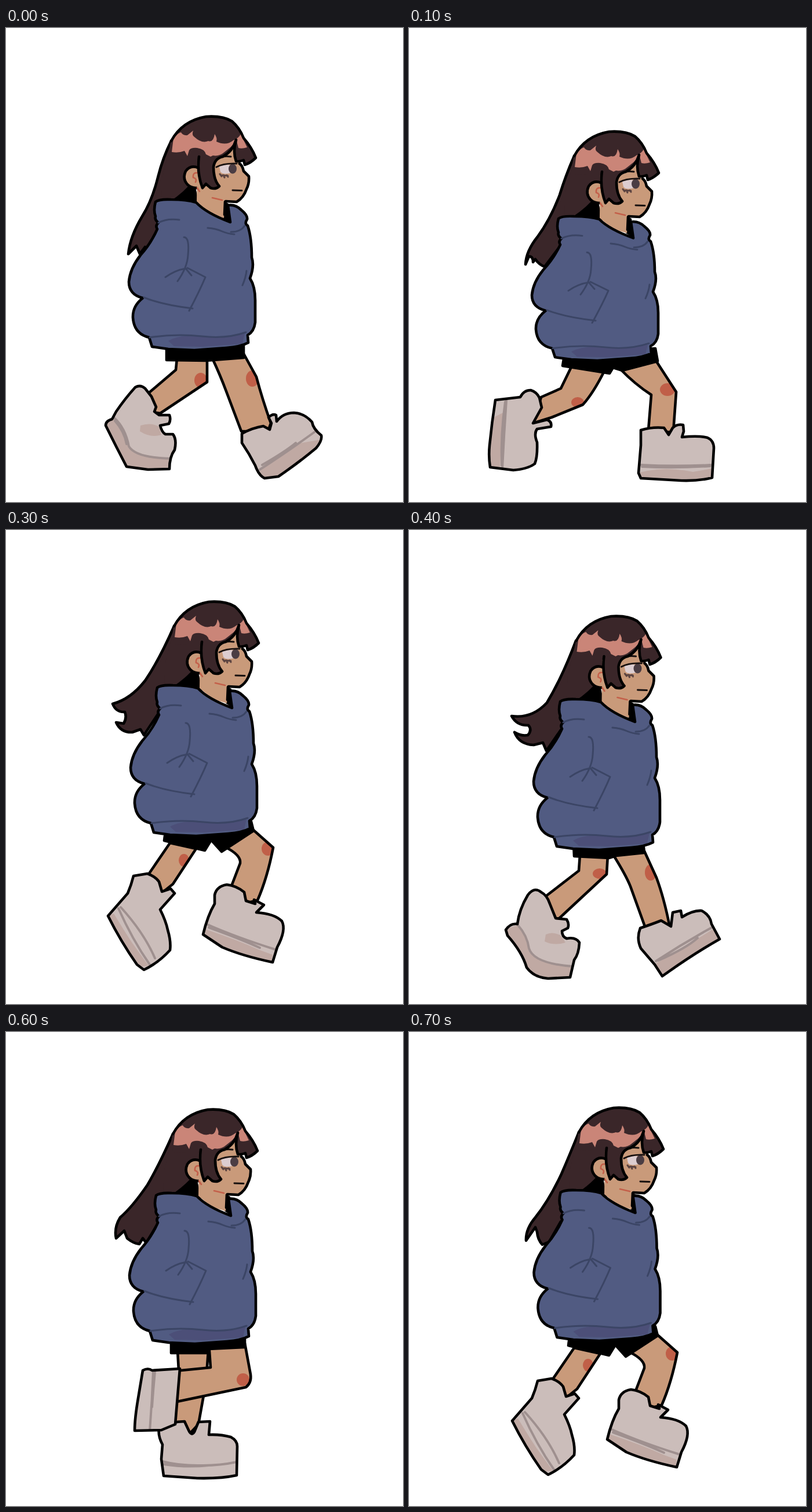
An HTML page for the animation above (0.8 s loop, 685 px wide and 818 px high).

```html
<!DOCTYPE html>
<html lang="en">
<head>
<meta charset="utf-8">
<title>Walk cycle</title>
<style>
html, body { margin: 0; width: 100%; height: 100%; overflow: hidden; background: #fff; }
svg { display: block; width: 100%; height: 100%; }
path, ellipse { fill: none; stroke-linecap: round; stroke-linejoin: round; }
.ink { stroke: #000; stroke-width: 4.6; }
.black { fill: #000; }
.skin { fill: #c99a7a; }
.hair { fill: #3a2629; }
.shine { fill: #ca8578; }
.cloth { fill: #515b82; }
.hem { fill: #4c4f78; }
.fold { stroke: #3b4565; stroke-width: 3; }
.shoe { fill: #cbbdba; }
.sole { fill: #c0a9a3; }
.seam { stroke: #9f908f; stroke-width: 4; }
.knee { fill: #c05f48; }
.red { stroke: #c4604a; stroke-width: 2.6; }
.white { fill: #dccdd0; }
.iris { fill: #4b3d43; }
.thin { stroke: #17100f; stroke-width: 3; }
.lash { stroke: #5b4340; stroke-width: 3; }
.pose { visibility: hidden; animation: show 800ms step-end infinite; animation-delay: calc(var(--i) * 100ms - 800ms); }
@keyframes show { 0% { visibility: visible; } 12.5%, 100% { visibility: hidden; } }
</style>
</head>
<body>
<svg id="stage" viewBox="0 0 685 818"></svg>
<script>
let clips = 0;
const path = (cls, d) => `<path class="${cls}" d="${d}"/>`;
const oval = (cls, x, y, rx, ry) => `<ellipse class="${cls}" cx="${x}" cy="${y}" rx="${rx}" ry="${ry}"/>`;
const use = (id, move = '') => `<use href="#${id}" transform="${move}"/>`;

// A filled, outlined shape whose inner details stay inside its edge.
function shape(cls, d, details = '', line = d) {
  const id = 'c' + clips++;
  return `<clipPath id="${id}"><path d="${d}"/></clipPath>` +
    `<g clip-path="url(#${id})">${path(cls, d)}${details}</g>` + path('ink', line);
}
const leg = (d, x, y, rx, ry) => shape('skin', d, oval('knee', x, y, rx, ry));
const shoe = (d, seam, sole = '', extra = '') =>
  shape('shoe', d, (sole && path('sole', sole)) + extra + path('seam', seam));
const shorts = d => path('black ink', d);

const fringe = 'M285 195Q304 160 345 153Q374 151 390 161Q403 172 410 190Q424 206 431 224Q422 233 412 236L410 228Q403 231 397 230Q391 213 397 193Q391 213 374 222Q360 225 358 240Q358 262 368 273Q362 279 353 276L345 269L339 276Q329 250 333 222';

const head = [
  path('hair', 'M285 194L278 225L270 258L268 300H300L328 272L334 200Z'),
  path('black', 'M282 300Q308 283 324 262L334 306ZM375 298L384 303L388 337L374 328Z'),
  path('skin', 'M330 222L396 196L402 232Q405 238 409 241Q411 250 420 255Q420 268 415 278Q410 294 398 300Q386 302 378 299L376 328L352 321L329 302Z'),
  path('ink', 'M403 234Q408 237 410 247L419 256Q420 268 415 278Q410 293 398 300L379 299'),
  path('ink', 'M378 300L377 322'),
  path('skin ink', 'M331 241Q318 236 310 247Q304 260 313 270Q320 277 330 276'),
  path('skin', 'M326 244H342V280L330 279Z'),
  path('red', 'M330 250Q322 249 323 258Q330 260 327 266M330 276L334 282M356 293L373 297'),
  path('white', 'M368 239Q380 234 388 237L388 250Q374 254 370 248Z'),
  oval('iris', 391, 243, 7, 8.5),
  path('thin', 'M363 240Q376 233 398 234M359 226Q374 220 388 222M391 280L407 280.5'),
  path('lash', 'M369 252L372 256M375 254L377 258M381 254L383 257M371 254L383 255'),
  shape('hair', fringe + 'L333 228L284 226Z',
    path('shine', 'M289 190Q297 181 302 180Q305 186 313 185L323 177Q320 185 325 188Q338 200 349 195Q358 198 360 183Q365 190 363 196Q380 204 392 194Q402 190 405 183L416 206Q407 209 401 207L398 195L387 206L377 214Q368 222 357 220L353 222L345 218Q343 209 330 207Q319 206 316 211L313 221L308 212Q298 216 286 214Z'),
    fringe)
].join('');

const hoodie = [
  shape('cloth', 'M258 300Q264 295 285 296Q312 296 328 301Q346 320 387 335L383 306Q396 304 406 314Q417 323 416 330Q411 338 417 341Q424 362 424 396Q429 410 421 432Q430 446 430 470V508Q428 524 417 530L418 543Q405 550 380 552L325 556L280 554L252 550L247 534Q221 528 219 500Q218 480 236 466Q212 460 212 438Q214 415 232 392Q250 372 261 347Q257 341 263 336Q256 331 258 325Q254 315 258 300Z',
    path('hem', 'M280 540Q300 528 340 532Q380 536 412 527L408 545L340 550L290 549Z')),
  path('fold', 'M263 336Q278 328 299 331M348 345Q362 346 373 351Q382 355 394 356M388 352Q405 352 412 341'),
  path('fold', 'M307 361Q317 361 314 392Q313 413 296 437M275 430Q292 418 310 415L320 427M313 414L344 430Q334 454 316 488M238 465Q270 478 322 484'),
  path('fold', 'M415 419Q414 430 408 444M248 534Q294 527 338 532Q380 537 414 525')
].join('');

const push =
  leg('M285 545L246 602L270 632L290 616L330 555Z', 309, 575, 9, 11) +
  leg('M380 552Q408 566 406 580L390 622L420 648L436 644Q453 605 463 553L428 522Z', 454, 555, 11, 12) +
  shoe('M222 602L246 598Q260 603 266 612L271 629L286 624L293 632L268 660Q278 680 281 695Q287 715 285 730Q265 752 240 764L228 755Q200 715 178 671L212 632Q218 618 222 602Z',
    'M196 658Q220 712 250 755M200 656Q240 700 259 744', 'M188 667Q208 700 220 718L248 757L228 760L176 672Z') +
  shoe('M362 635Q365 620 383 617Q400 619 413 630L416 645L432 650L430 643L447 652L434 665Q465 667 478 680Q486 695 470 725L462 751Q410 740 375 725L342 703Q350 670 362 650Z',
    'M350 686Q400 708 467 729M352 691Q405 710 440 726', 'M346 694Q400 712 440 730L462 738L460 752L375 728L340 704Z') +
  shorts('M276 533L275 541L345 558L356 540L374 560L429 524L425 508Z');

const stand =
  leg('M296 553L299 605L286 682L318 695L332 680L345 608L349 553Z', 339, 594, 11, 12) +
  shoe('M264 688Q285 675 308 675L315 690Q320 701 325 693L332 676L352 675L350 698Q370 697 388 702Q399 708 399 718L398 768Q370 774 330 773L272 769L268 740L270 715Q262 700 264 688Z',
    'M270 744Q300 752 340 751Q370 751 398 745M272 749Q310 755 350 751');
const lifted = shoe('M236 587Q245 582 252 587L300 584L292 680L268 690L222 691Q222 670 228 635Z',
  'M254 588Q252 640 248 692M257 589Q254 620 252 650');
const passShorts = shorts('M285 534V554H348L350 547L412 544V522Z');

const parts = { head, hoodie, push, stand, lifted };

const poses = [
  { head: [0, 0], body: [1, 0, 0],
    tail: 'M285 195Q270 225 262 258Q252 298 235 325Q214 360 211 390L225 376L231 390L240 378L246 387L262 346L300 330',
    legs: leg('M295 570L293 590L246 630L248 662L266 665L347 611V570Z', 336, 608, 11, 13) +
      leg('M356 570Q370 600 380 627L406 696H452L457 682Q442 640 432 602L410 562Z', 425, 605, 11, 14) +
      shoe('M223 620Q232 615 240 622L251 636L259 654L256 662L264 668L282 668Q285 676 281 683L266 686Q269 698 275 701L288 701Q295 710 291 728Q282 740 282 761L245 762L208 757L190 722L172 686Q172 678 183 675L190 662Q205 640 223 620Z',
        'M186 672Q206 690 212 722Q224 742 286 743M188 678Q204 696 208 718',
        'M186 672Q206 690 212 722Q224 742 286 743V770H200L165 680Z',
        path('sole', 'M232 686Q250 680 264 688L268 702Q250 708 231 696Z')) +
      shoe('M407 700Q425 690 444 687L455 693L458 682L453 672Q460 665 466 668L467 679Q478 664 497 664Q515 665 528 680Q530 692 544 703Q546 712 535 725Q505 750 470 774L446 777Q436 772 430 755Q420 735 407 716Z',
        'M438 762Q490 728 534 696M442 754Q482 731 500 716', 'M438 765Q470 738 510 716L545 710L530 740L470 785H438Z') +
      shorts('M277 550V573L345 574L410 569V545Z') },
  { head: [0, 26], body: [0.957, 0, 41.8],
    tail: 'M285 221Q270 255 260 288Q244 330 222 360Q202 385 201 408L207 394Q214 394 214 404L218 399Q224 408 234 412L262 375L300 355',
    legs: leg('M280 585L262 622L228 637L214 682L246 672L300 650Q318 630 337 592Z', 291, 646, 11, 9) +
      leg('M364 588Q390 615 418 633L413 694L456 698L461 628L426 574Z', 446, 624, 13, 11) +
      shoe('M149 642L192 637Q198 625 210 625Q220 628 225 638L229 655L214 682L238 676Q247 679 245 688L221 692Q215 700 221 715Q222 740 217 752Q205 761 180 763L140 758Q137 740 139 720Q143 680 149 642Z',
        'M168 642Q164 700 161 760M166 645Q158 700 160 755', 'M146 672L162 664L157 757L136 760Z') +
      shoe('M400 694Q420 688 440 690L448 702L455 690Q462 683 473 685L474 696L471 706Q500 703 515 707Q526 712 526 725L523 776Q500 782 470 781L400 777L396 768L400 720Z',
        'M400 754Q460 757 525 754M402 757Q460 760 520 756', 'M398 767Q440 756 490 766L524 760V785H396Z') +
      shorts('M268 565L265 583L346 596L352 586L368 591L429 575L425 553Z') },
  { head: [1.5, -20], body: [1, -1, -17.5],
    tail: 'M286 175Q262 228 240 263Q198 305 193 325Q188 345 195 357L206 345Q214 352 210 359Q222 362 229 362L232 354L240 364L258 335L300 315',
    legs: use('lifted') +
      leg('M368 545L371 583L335 591L338 631L424 613Q424 594 414 542Z', 412, 603, 11, 11) +
      use('stand') + passShorts },
  { head: [5, -29], body: [1, 3, -28],
    tail: 'M290 166Q264 225 240 260Q215 292 184 300Q190 315 205 314Q209 324 203 334L190 332Q198 350 218 349L232 344L238 354L262 318L300 300',
    legs: use('push', 'translate(-2 -5)') },
  { head: [3.5, -4], body: [1, 3, -4],
    tail: 'M288 191Q264 255 238 298Q212 326 177 321Q186 338 206 337Q213 345 205 354Q193 356 182 349Q190 370 215 371L231 367L237 381L262 345L300 325',
    legs: leg('M295 560L293 588L236 632L255 674L341 594L343 560Z', 329, 593, 12, 9) +
      leg('M352 560Q374 595 382 615L408 687L450 685Q440 635 427 600L406 554Z', 417, 591, 10, 14) +
      shoe('M205 630Q216 615 228 625Q238 630 243 645L253 670L272 672Q277 680 274 687L264 692Q264 702 272 705Q288 702 294 712Q293 732 285 742L278 772L240 774Q215 772 203 755Q195 728 170 700L167 690Q175 678 187 680Q190 655 205 630Z',
        'M188 682Q204 700 207 722Q215 748 282 753', 'M188 682Q204 700 207 722Q215 748 282 753V780H210L162 690Z',
        path('sole', 'M236 698Q248 692 262 700L270 712Q250 718 234 710Z')) +
      shoe('M399 687Q420 680 435 674L452 684L455 660L469 657L471 668Q490 656 505 657Q520 665 522 680L536 706Q490 732 437 770L424 750L400 722Q392 705 399 687Z',
        'M426 744Q475 712 526 684M430 743Q478 722 498 704', 'M426 748Q475 720 526 688L540 706L437 776Z') +
      shorts('M284 543L285 563L345 566L358 562L406 557L404 538Z') },
  { head: [0.5, 31], body: [0.937, 1, 49.8],
    tail: 'M285 226Q262 288 240 325Q215 362 179 364Q186 377 205 377Q213 380 209 390Q198 396 187 392Q195 408 215 410L230 405L234 413L262 378L300 360',
    legs: leg('M280 584L262 626L226 642L230 686Q270 668 308 647Q325 625 342 586Z', 299, 641, 11, 9) +
      leg('M360 584Q385 608 413 635L409 682L455 692L460 624L418 568Z', 451, 624, 11, 10) +
      shoe('M140 650L189 645Q198 630 210 627Q222 632 224 645L233 660L223 682L245 683L243 696Q225 697 217 702L219 750Q205 765 180 767L132 769Q130 720 140 650Z',
        'M165 650Q160 710 156 770', 'M135 648H165Q160 710 156 772H128Z') +
      shoe('M397 682Q415 676 432 678L447 692L455 676Q465 670 470 680L466 696Q500 693 515 703L519 725L515 770Q460 773 420 770L404 764L406 735Q400 705 397 682Z',
        'M406 742Q460 752 519 747', 'M400 758L480 753L519 748V775H400Z') +
      shorts('M276 562L273 585L348 589L353 582L362 586L421 571L418 553Z') },
  { head: [3, -19], body: [1, 1, -18],
    tail: 'M288 176Q264 230 244 264Q218 302 197 320Q186 338 190 356L204 343L209 356Q220 365 230 366L236 356L242 364L260 334L300 315',
    legs: use('stand', 'translate(0 -3)') +
      leg('M350 537L353 579L292 585L290 639L414 613Q424 605 422 591L412 537Z', 409, 600, 11, 11) +
      use('lifted', 'translate(0 -3)') + passShorts },
  { head: [8, -22], body: [1, 3.5, -23],
    tail: 'M293 173Q276 215 263 245Q242 290 218 320Q201 340 202 360L218 337L221 345Q222 358 230 367L242 362L262 327L300 310',
    legs: use('push') }
];

const draw = ({ head: [hx, hy], body: [sy, bx, by], tail, legs }, i) =>
  `<g class="pose" style="--i:${i}">${path('hair ink', tail)}${legs}` +
  use('head', `translate(${hx} ${hy})`) +
  use('hoodie', `matrix(1 0 0 ${sy} ${bx} ${by})`) + '</g>';

const defs = Object.entries(parts).map(([id, art]) => `<g id="${id}">${art}</g>`).join('');
document.getElementById('stage').innerHTML = `<defs>${defs}</defs>` + poses.map(draw).join('');
</script>
</body>
</html>
```
